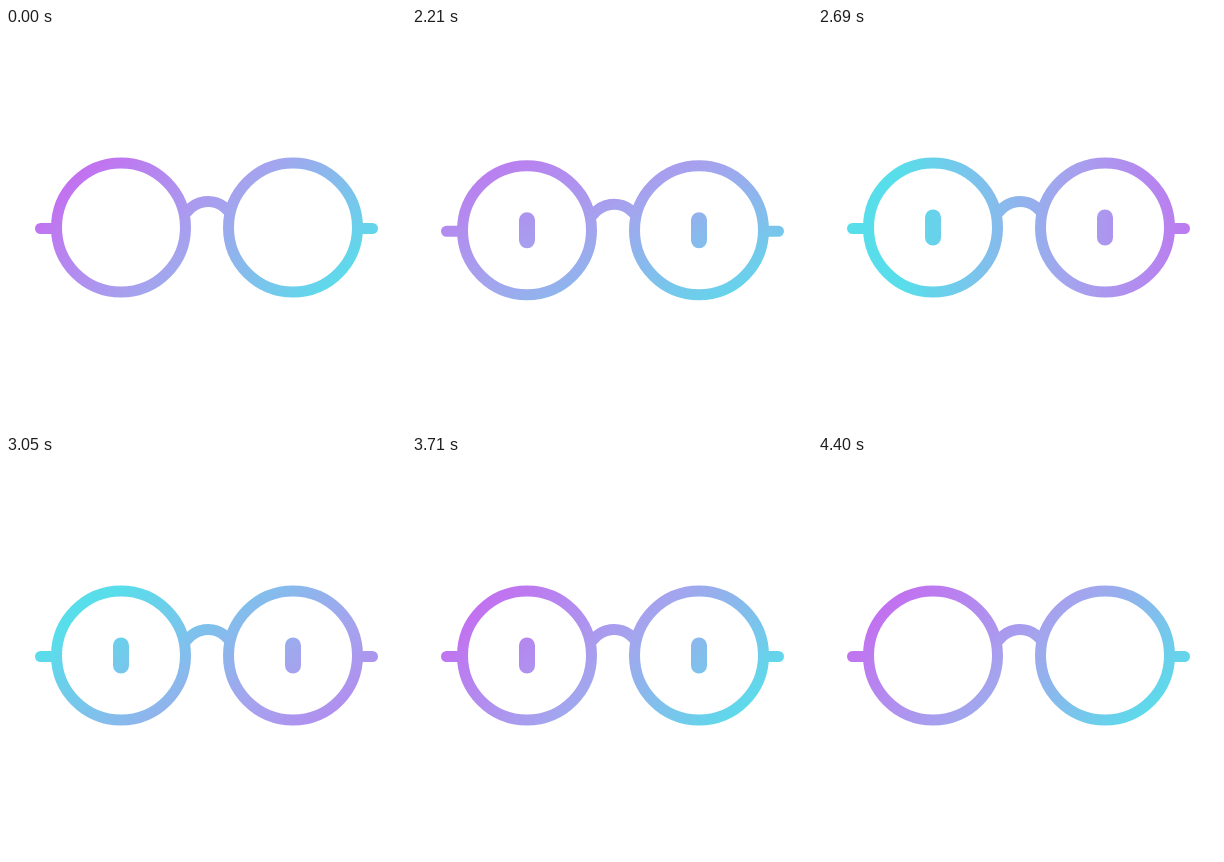
An HTML page with a canvas that plays this animation: 400x400 px, repeating every 4.43 s.

```html
<!DOCTYPE html>
<html lang="en">
<head>
<meta charset="utf-8">
<title>Glasses</title>
<style>
  html, body { margin: 0; width: 100%; height: 100%; overflow: hidden; background: #fff; }
  canvas { display: block; width: 100vmin; height: 100vmin; }
</style>
</head>
<body>
<canvas id="stage" width="400" height="400"></canvas>
<script>
const ctx = document.getElementById('stage').getContext('2d');
const LOOP = 4430, STEP = 30;

// Keys are [time, value]; values are held outside the range.
function track(keys, time, ease = p => p) {
  if (time <= keys[0][0]) return keys[0][1];
  for (let i = 1; i < keys.length; i++) {
    const [t0, v0] = keys[i - 1], [t1, v1] = keys[i];
    if (time < t1) return v0 + (v1 - v0) * ease((time - t0) / (t1 - t0), i);
  }
  return keys[keys.length - 1][1];
}

// A sudden kick followed by smooth swings between the extremes.
const swing = (p, i) => i === 1 ? Math.sin(p * Math.PI / 2) : (1 - Math.cos(p * Math.PI)) / 2;

const HOP = [[2000, 0], [2120, -19], [2255, 10], [2405, -3.6], [2540, 0]];
const DROP = [[4040, 0], [4130, 9.5], [4220, -5], [4310, 2], [4400, 0]];
const TILT = [[3050, 0], [3170, 4], [3290, -2.5], [3410, 0.5], [3500, 0]];
const EYES = [[2060, 0], [2200, 1], [4130, 1], [4250, 0]];

// Gradient direction in degrees, length in pixels and colour position at the centre.
const ANGLE = [[2000, 45], [2420, 80], [2840, 232], [3050, 232], [3440, 318], [3560, 405]];
const LENGTH = [[2000, 283], [2420, 315], [2840, 340], [3050, 340], [3440, 283]];
const CENTRE = [[2000, 0.5], [2420, 0.575], [2840, 0.68], [3050, 0.68], [3440, 0.5]];

function gradient(time) {
  const angle = track(ANGLE, time) * Math.PI / 180;
  const length = track(LENGTH, time), centre = track(CENTRE, time);
  const point = t => [
    200 + Math.cos(angle) * length * (t - centre),
    200 + Math.sin(angle) * length * (t - centre)
  ];
  const fill = ctx.createLinearGradient(...point(0), ...point(1));
  ['#c56cf0', '#a4a4ee', '#58deea'].forEach((colour, i) => fill.addColorStop(i / 2, colour));
  return fill;
}

function line(x0, y0, x1, y1) {
  ctx.moveTo(x0, y0);
  ctx.lineTo(x1, y1);
}

function ring(x) {
  ctx.moveTo(x + 64.5, 199.5);
  ctx.arc(x, 199.5, 64.5, 0, Math.PI * 2);
}

function draw(time) {
  ctx.setTransform(1, 0, 0, 1, 0, 0);
  ctx.fillStyle = '#fff';
  ctx.fillRect(0, 0, 400, 400);

  ctx.translate(200, 200 + track(HOP, time, swing) + track(DROP, time, swing));
  ctx.rotate(track(TILT, time, swing) * Math.PI / 180);
  ctx.translate(-200, -200);
  ctx.strokeStyle = gradient(time);
  ctx.lineCap = 'round';

  ctx.lineWidth = 11;
  ctx.beginPath();
  ring(115);
  ring(287);
  line(34.5, 200.5, 50, 200.5);
  line(352, 200.5, 366.5, 200.5);
  ctx.moveTo(181, 184);
  ctx.arc(202, 199.75, 26.25, -2.498, -0.644);
  ctx.stroke();

  const open = track(EYES, time);
  if (open > 0) {
    ctx.lineWidth = 16 * open;
    ctx.beginPath();
    for (const x of [115, 287]) line(x, 199.5 - 10 * open, x, 199.5 + 10 * open);
    ctx.stroke();
  }
}

function frame() {
  const time = performance.now() % LOOP;
  draw(Math.floor((time - 20) / STEP) * STEP + 20);
  requestAnimationFrame(frame);
}
frame();
</script>
</body>
</html>
```
